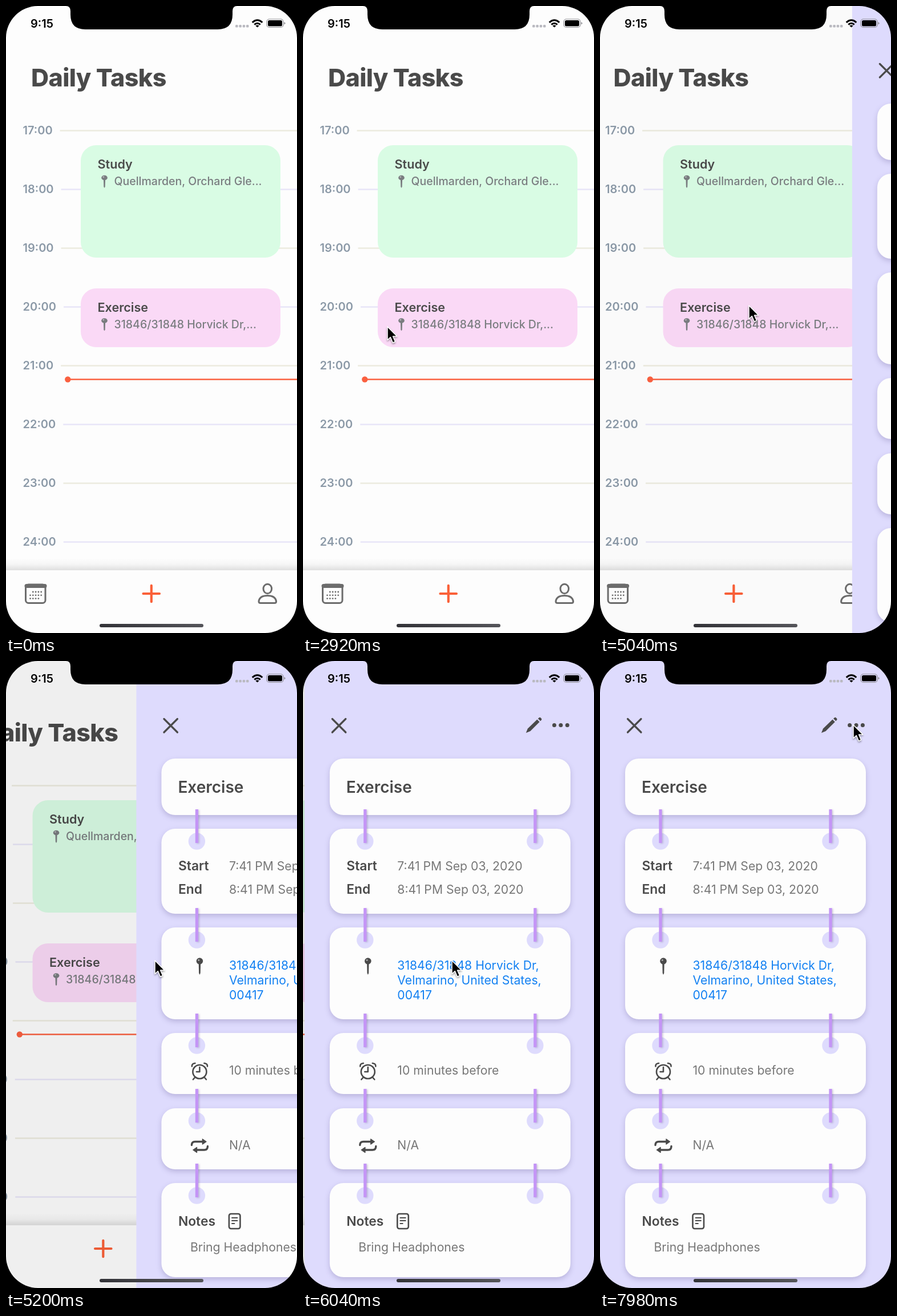
An HTML page for the animation above (8000 ms loop, 510 by 1099 pixels).

```html
<!DOCTYPE html>
<html lang="en">
<head>
<meta charset="utf-8">
<title>Daily planner</title>
<style>
  html, body { margin: 0; width: 100%; height: 100%; overflow: hidden; background: #000; }
  svg { display: block; width: 100vw; height: 100vh; font-family: Inter, "Liberation Sans", sans-serif; }
  .title { font-size: 43px; font-weight: 800; fill: #4a4a4a; letter-spacing: -.6px; }
  .hour { font-size: 20px; font-weight: 600; fill: #8b99a7; }
  .task { font-size: 21.6px; font-weight: 600; fill: #4a4a4a; }
  .place { font-size: 19.5px; font-weight: 500; fill: #7a7d80; }
  .head { font-size: 28px; font-weight: 600; fill: #4a4a4a; }
  .label { font-size: 22.8px; font-weight: 600; fill: #4a4a4a; }
  .value { font-size: 21.2px; fill: #777; }
  .link { font-size: 21.2px; fill: #1280f2; }
  .line { fill: none; stroke-linecap: round; stroke-linejoin: round; }
  #cards { filter: drop-shadow(0 4px 5px rgba(70, 60, 120, .24)); }
  #bars { filter: drop-shadow(2px 1px 1.5px rgba(60, 40, 90, .22)); }
  #cursor { filter: drop-shadow(0 2px 1.5px rgba(0, 0, 0, .35)); }
</style>
</head>
<body>
<svg viewBox="0 0 510 1099" preserveAspectRatio="none">
  <defs>
    <linearGradient id="lift" x1="0" y1="0" x2="0" y2="1">
      <stop offset="0" stop-color="#000" stop-opacity="0"/>
      <stop offset=".5" stop-color="#000" stop-opacity=".03"/>
      <stop offset="1" stop-color="#000" stop-opacity=".12"/>
    </linearGradient>
    <linearGradient id="homeInk" x1="0" y1="0" x2="1" y2="0">
      <stop offset="0" stop-color="#333338"/>
      <stop offset="1" stop-color="#55555a"/>
    </linearGradient>
    <g id="pin">
      <circle r="5.8"/>
      <path d="M-1.7 4H1.7L1.3 21 0 24-1.3 21Z"/>
      <circle cx="-1.7" cy="-1.7" r="1.5" fill="#fff" opacity=".55"/>
    </g>
  </defs>

  <g id="page">
    <rect width="510" height="1099" fill="#fdfdfd"/>
    <text class="title" x="44" y="141">Daily Tasks</text>
    <g id="hours"></g>

    <rect x="131" y="244" width="350" height="197" rx="27" fill="#d9fce4"/>
    <text class="task" x="160.500" y="285">Study</text>
    <use href="#pin" transform="translate(172.500 301) scale(.92 .75)" fill="#7a7d80"/>
    <text class="place" x="189.500" y="314">Quellmarden, Orchard Gle...</text>

    <rect x="131" y="495" width="350" height="103" rx="27" fill="#fad9f6"/>
    <text class="task" x="160.500" y="535.500">Exercise</text>
    <use href="#pin" transform="translate(172.500 551.500) scale(.92 .75)" fill="#7a7d80"/>
    <text class="place" x="189.500" y="564.500">31846/31848 Horvick Dr,...</text>

    <path d="M108 654.500H510" stroke="#fa6040" stroke-width="2.500"/>
    <circle cx="108.300" cy="654.500" r="5.200" fill="#fa6040"/>

    <rect y="968" width="510" height="21" fill="url(#lift)"/>
    <rect y="989" width="510" height="110" fill="#fdfdfd"/>
    <g class="line" stroke="#6c6c6c" stroke-width="3">
      <rect x="34.500" y="1014" width="34.500" height="32.500" rx="5"/>
      <path d="M36 1016.500H68" stroke-width="7"/>
      <g id="days" stroke="none" fill="#6c6c6c"></g>
      <ellipse cx="458.300" cy="1021.500" rx="7.300" ry="8.300"/>
      <path d="M446 1046.500Q443 1046.500 443 1043.500C444 1036 450 1033.500 458.300 1033.500S472.500 1036 473.600 1043.500Q473.600 1046.500 470.600 1046.500Z"/>
    </g>
    <path class="line" d="M240.500 1030H269M254.800 1015.800V1044.200" stroke="#fa6038" stroke-width="4.200"/>
    <rect id="dim" width="510" height="1099" opacity="0"/>
  </g>

  <g id="panel">
    <rect width="510" height="1099" fill="#dedbfd"/>
    <path class="line" d="M48.500 101.500L72 125M72 101.500L48.500 125" stroke="#4a4a4a" stroke-width="3.200"/>
    <g fill="#4a4a4a">
      <path d="M388 126L391 118.500 407.500 102.500 411.800 106.800 395.500 123Z"/>
      <path d="M409 101L411 99.200Q412.500 98.200 414 99.700L415 100.700Q416.300 102.200 415 103.500L413.300 105.300Z"/>
      <circle cx="437.600" cy="112.600" r="3.500"/>
      <circle cx="449" cy="112.600" r="3.500"/>
      <circle cx="460.400" cy="112.600" r="3.500"/>
    </g>
    <g id="cards" fill="#fdfdfd"></g>
    <g id="holes" fill="#dedbfd"></g>
    <g id="bars" fill="#c495f6"></g>

    <text class="head" x="73" y="231">Exercise</text>
    <text class="label" x="73.500" y="367">Start</text>
    <text class="value" x="162.500" y="367">7:41 PM Sep 03, 2020</text>
    <text class="label" x="73.500" y="408">End</text>
    <text class="value" x="162.500" y="408">8:41 PM Sep 03, 2020</text>
    <use href="#pin" transform="translate(111 526)" fill="#4a4a4a"/>
    <text class="link" x="162.500" y="540.500">31846/31848 Horvick Dr,</text>
    <text class="link" x="162.500" y="566.500">Velmarino, United States,</text>
    <text class="link" x="162.500" y="592.500">00417</text>
    <text class="value" x="162.500" y="724.500">10 minutes before</text>
    <text class="value" x="162.500" y="856">N/A</text>
    <text class="label" x="73.500" y="990">Notes</text>
    <text class="value" x="94.500" y="1035">Bring Headphones</text>

    <g class="line" stroke="#4a4a4a" stroke-width="2.600">
      <circle cx="111" cy="720" r="12"/>
      <path d="M111 712V720H105.500M103 729.500L99.500 733.500M119 729.500L122.500 733.500M97.500 710.500Q97 705.500 103 705M124.500 710.500Q125 705.500 119 705"/>
      <path d="M97 848.500Q97 842.500 103 842.500H117M125 850.500Q125 857 119 857H105" stroke-width="3.400"/>
      <path d="M116 838V847L122.500 842.500ZM106 852.500V861.500L99.500 857Z" fill="#4a4a4a" stroke-width="1.500"/>
      <rect x="162.500" y="969" width="19.500" height="26" rx="3.500"/>
      <path d="M167.500 976H177M167.500 981H177M167.500 986H172" stroke-width="1.800"/>
    </g>
  </g>

  <g id="status">
    <text x="43" y="37.500" font-size="20" font-weight="600">9:15</text>
    <g fill="#b9b9c0">
      <rect x="402" y="33" width="4.600" height="4.600" rx="1.500"/>
      <rect x="408.300" y="33" width="4.600" height="4.600" rx="1.500"/>
      <rect x="414.600" y="33" width="4.600" height="4.600" rx="1.500"/>
      <rect x="420.900" y="33" width="4.600" height="4.600" rx="1.500"/>
    </g>
    <g fill="none" stroke="#000" stroke-width="3">
      <path d="M431.700 28.800Q440.500 20.800 449.300 28.800M435.300 32.600Q440.500 28 445.700 32.600"/>
      <path d="M440.500 37.500L437.400 34.700Q440.500 32.200 443.600 34.700Z" fill="#000" stroke="none"/>
    </g>
    <rect x="457" y="23" width="29" height="14.500" rx="4.500" fill="none" stroke="#8d8d92" stroke-width="1.200"/>
    <rect x="459" y="25" width="25" height="10.500" rx="2.600"/>
    <path d="M487.500 28V32.500Q489.500 31.500 489.500 30.200T487.500 28Z" fill="#8d8d92"/>
    <rect x="164" y="1083" width="182" height="6" rx="3" fill="url(#homeInk)"/>
  </g>

  <path fill-rule="evenodd" d="M0 0H510V1099H0ZM56 0A56 56 0 0 0 0 56V1043A56 56 0 0 0 56 1099H454A56 56 0 0 0 510 1043V56A56 56 0 0 0 454 0Z"/>
  <path d="M105 0Q113 0 113 9V15Q113 41 139 41H371Q397 41 397 15V9Q397 0 405 0Z"/>

  <path id="cursor" d="M0 0V23.500L5.300 18.600 9.400 28.300 13.600 26.500 9.600 17H16.800Z" stroke="#fff" stroke-width="1.500" stroke-linejoin="round"/>
</svg>
<script>
  const $ = id => document.getElementById(id);
  const add = (parent, tag, attrs, text = '') => {
    const el = document.createElementNS('http://www.w3.org/2000/svg', tag);
    for (const name in attrs) el.setAttribute(name, attrs[name]);
    el.textContent = text;
    return $(parent).appendChild(el);
  };

  for (let i = 0; i < 8; i++) {
    const y = 218 + 103 * i;
    const label = add('hours', 'text', { class: 'hour', x: 29.5, y: y + 7 }, `${17 + i}:00`);
    const x = 42.5 + label.getComputedTextLength();
    add('hours', 'path', {
      d: `M${x} ${y + .5}H510`, 'stroke-width': 2.4, stroke: i % 2 ? '#e8e6f8' : '#ecebdf'
    });
  }

  for (let row = 0; row < 3; row++) {
    for (let col = 0; col < 5; col++) {
      if ((row === 0 && col === 0) || (row === 2 && col === 4)) continue;
      add('days', 'circle', { cx: 42.5 + col * 4.8, cy: 1027 + row * 5.8, r: 1.4 });
    }
  }

  const cards = [[171, 99], [294, 149], [467, 161], [652, 107], [784, 107], [915, 165]];
  cards.forEach(([y, height], i) => {
    add('cards', 'rect', { x: 44, y, width: 422, height, rx: 24 });
    if (!i) return;
    for (const x of [106, 404]) {
      add('holes', 'circle', { cx: x, cy: y + 22, r: 14.7 });
      add('bars', 'rect', { x: x - 2.6, y: y - 34, width: 5.2, height: 59 });
    }
  });

  // Screen updates come in groups of three: 20, 20 and 100 ms.
  const LOOP = 8000;
  const stepAt = t => {
    const group = Math.floor((t + 20) / 140);
    const rest = (t + 20) % 140;
    return group * 3 + (rest < 20 ? 0 : rest < 40 ? 1 : 2);
  };

  const linear = p => p;
  const easeIn = p => p * p;
  const easeOut = p => p * (2 - p);

  // Step, x, y and the easing used to get there.
  const route = [
    [56, -20, 640, linear],
    [63, 148, 562, linear],
    [71, 261, 525, easeOut],
    [137, 261, 525, linear],
    [147, 379, 224, easeIn],
    [153, 444, 112, easeOut]
  ];
  const cursorAt = step => {
    const i = route.findIndex(key => key[0] > step);
    if (i === 0) return [-60, 640];
    if (i < 0) return route[route.length - 1].slice(1, 3);
    const [s0, x0, y0] = route[i - 1];
    const [s1, x1, y1, ease] = route[i];
    const p = ease((step - s0) / (s1 - s0));
    return [x0 + (x1 - x0) * p, y0 + (y1 - y0) * p];
  };

  // Critically damped spring, from 1 to 0.
  const PUSH_STEP = 107;
  const spring = k => {
    if (k <= 0) return 1;
    const x = .304 * k + .027;
    return (1 + x) * Math.exp(-x);
  };

  const move = (id, x, y = 0) => $(id).setAttribute('transform', `translate(${x.toFixed(2)} ${y.toFixed(2)})`);

  const start = performance.now();
  const draw = now => {
    const step = stepAt(Math.max(0, now - start) % LOOP);
    const left = spring(step - PUSH_STEP);
    move('panel', 510 * left);
    move('page', -153 * (1 - left));
    $('dim').setAttribute('opacity', .1 * (1 - left));
    move('cursor', ...cursorAt(step));
    requestAnimationFrame(draw);
  };
  draw(start);
</script>
</body>
</html>
```
